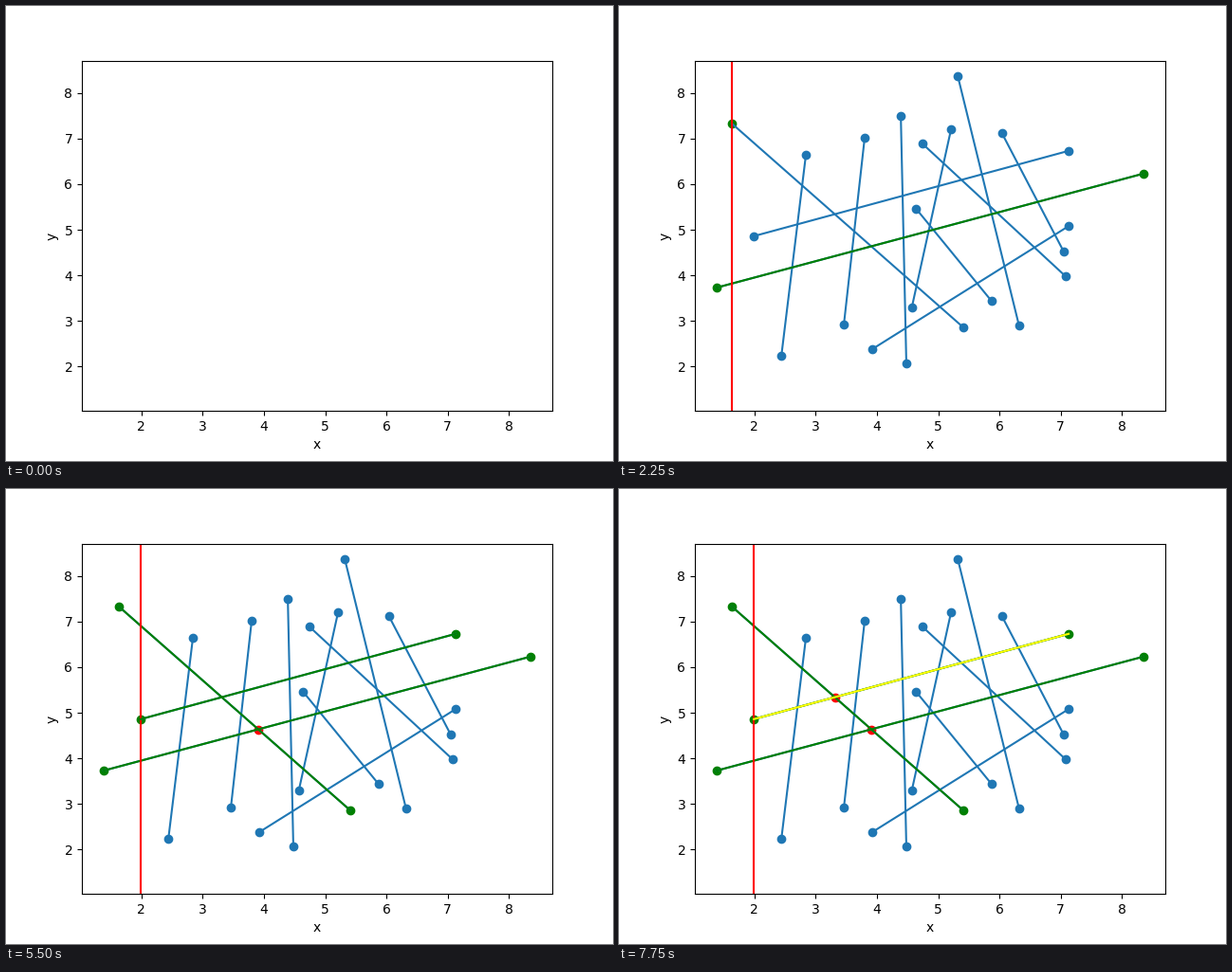
Write a matplotlib script that moves like this. It is 640x480 px and loops after 8 s.

```python
import numpy as np
import matplotlib.pyplot as plt
from matplotlib.animation import FuncAnimation

FRAMES, STEP_MS = 32, 250
LIMITS = (1.0274, 8.7084)

# Each segment runs from its left end to its right end.
segments = [
    ((1.38, 3.73), (8.35, 6.23)), ((1.63, 7.33), (5.41, 2.86)),
    ((1.99, 4.86), (7.13, 6.73)), ((2.44, 2.24), (2.84, 6.64)),
    ((3.46, 2.92), (3.80, 7.02)), ((4.39, 7.49), (4.48, 2.07)),
    ((4.57, 3.30), (5.21, 7.20)), ((4.64, 5.46), (5.87, 3.44)),
    ((4.74, 6.89), (7.08, 3.98)), ((5.32, 8.37), (6.32, 2.90)),
    ((6.04, 7.12), (7.05, 4.52)), ((3.92, 2.38), (7.13, 5.08)),
]

fig, ax = plt.subplots(figsize=(6.4, 4.8), dpi=100)
ax.set(xlim=LIMITS, ylim=LIMITS, xlabel="x", ylabel="y")

timeline = []  # [artist, first step, step after the last]
dots = {}      # newest timeline entry at each point


def show(artist, start, end=FRAMES):
    timeline.append([artist, start, end])


def layer(step):
    """Later lines lie above earlier ones."""
    return 2 + step / 100


def line(seg, color, start, end=FRAMES):
    xs, ys = zip(*seg)
    show(ax.plot(xs, ys, color=color, zorder=layer(start))[0], start, end)


def dot(point, color, start):
    """A dot replaces an earlier one at the same point."""
    if point in dots:
        dots[point][2] = start
    show(ax.scatter(*point, color=color, zorder=1), start)
    dots[point] = timeline[-1]


def crossing(s, t):
    """Point shared by two segments, or None."""
    p, q = np.array(s), np.array(t)
    d, e = p[1] - p[0], q[1] - q[0]
    u, v = np.linalg.solve(np.column_stack([d, -e]), q[0] - p[0])
    return tuple(p[0] + u * d) if 0 <= u <= 1 and 0 <= v <= 1 else None


def visit(seg, step):
    """Turn left end, segment and right end green, one step each."""
    left, right = seg
    dot(left, "green", step)
    line(seg, "green", step + 1)
    dot(right, "green", step + 2)
    return step + 3


def compare(new, old, step):
    """Highlight two segments, mark where they meet, then let go."""
    meet = crossing(new, old)
    done = step + (6 if meet else 4)
    line(new, "yellow", step, done - 1 + 0)
    line(old, "yellow", step + 1, done - 2)
    if meet:
        dot(meet, "red", step + 2)
    # The newer segment is released one step after the older one.
    timeline[-2 - bool(meet)][2] = done - 1
    return done


for seg in segments:
    for point in seg:
        dot(point, "C0", 1)
    line(seg, "C0", 2)

step = 3
swept = []
for seg in sorted(segments):
    if step >= FRAMES:
        break
    start = step
    sweep = ax.axvline(seg[0][0], color="red", zorder=layer(start))
    step = visit(seg, start + 1)
    for old in swept:
        step = compare(seg, old, step)
    show(sweep, start, step)
    swept.append(seg)
    step += 1


def update(frame):
    for artist, start, end in timeline:
        artist.set_visible(start <= frame < end)
    return [entry[0] for entry in timeline]


anim = FuncAnimation(fig, update, frames=FRAMES, interval=STEP_MS,
                     repeat=True, repeat_delay=0, blit=False)
plt.show()
```
